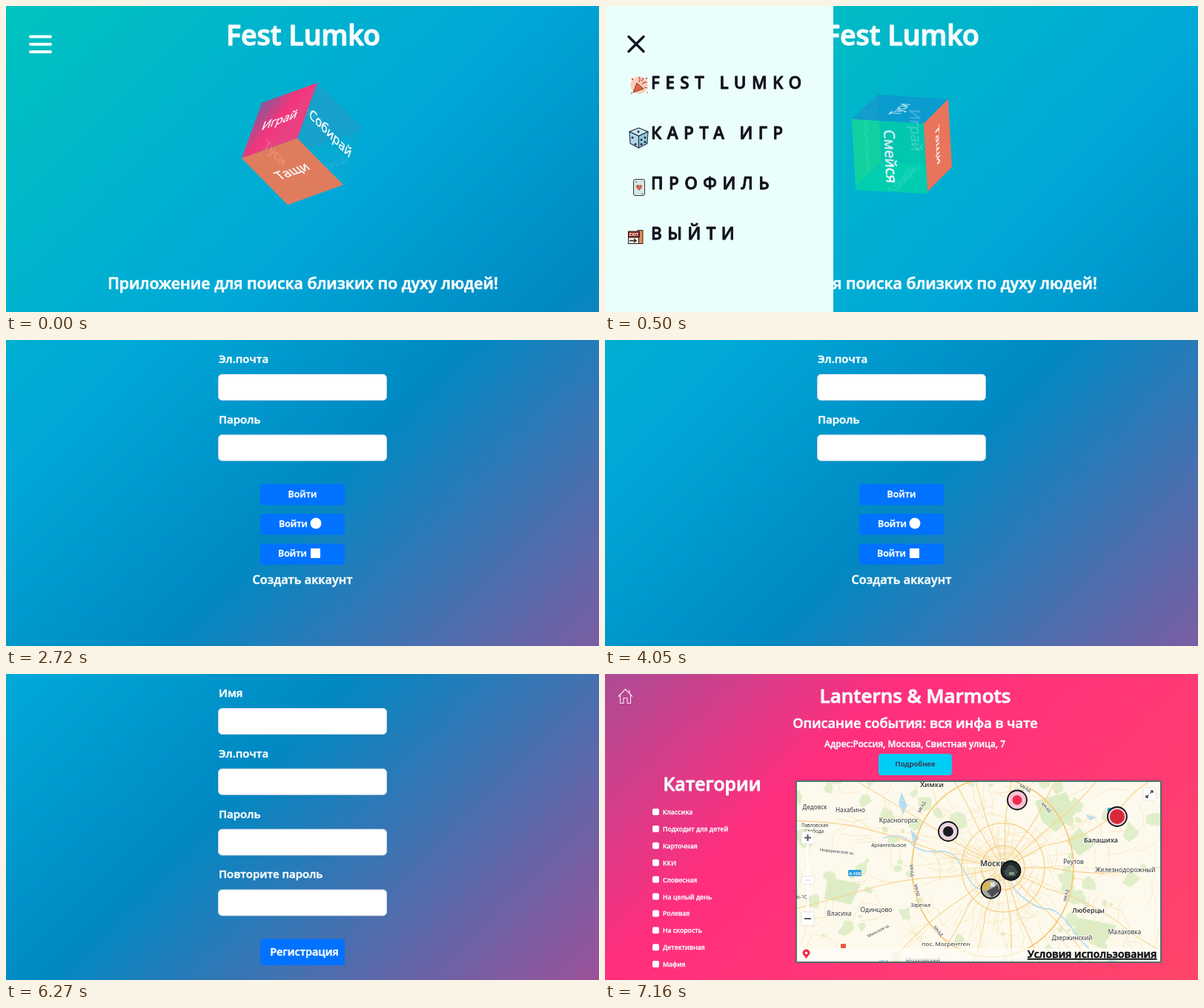
These frames come from a looping animation (800 by 414 pixels, 8000 ms). An HTML page:

```html
<!DOCTYPE html>
<html lang="ru">
<head>
<meta charset="utf-8">
<title>Fest Lumko</title>
<style>
html, body { margin: 0; width: 100%; height: 100%; overflow: hidden; background: #00a8d8; }
#reel { display: flex; width: 4000px; height: 414px; animation: reel 8s step-end infinite; }
#reel svg {
  flex: none; width: 800px; height: 414px; display: block; color: #f6fcfc;
  font-family: "Open Sans", "Noto Sans", sans-serif; font-weight: 600;
  background: linear-gradient(135deg,
    #00c3be calc(var(--d) - 813px), #00a8d8 calc(var(--d) - 311px), #0089c3 var(--d),
    #ff2e7e calc(var(--d) + 872px), #ff456a calc(var(--d) + 1445px));
}
text { fill: currentColor; stroke: currentColor; stroke-width: .035em; stroke-linejoin: round; }
.word { font-weight: 500; stroke-width: .03em; }
.place { color: #25262a; font-weight: 400; stroke: #fffdf5; stroke-width: 1.6px; paint-order: stroke; }
.town { font-weight: 600; }
@keyframes reel {
  0% { transform: translateX(0); }
  6.25% { transform: translateX(-800px); }
  34% { transform: translateX(-1600px); }
  61.75% { transform: translateX(-2400px); }
  89.5%, 100% { transform: translateX(-3200px); }
}
</style>
</head>
<body>
<div id="reel"></div>
<script>
const APP = 'Fest Lumko';
const text = (x, y, size, str, attrs = '') =>
  `<text x="${x}" y="${y}" font-size="${size}" ${attrs}>${str}</text>`;
const mid = (x, y, size, str, attrs = '') => text(x, y, size, str, 'text-anchor="middle" ' + attrs);
const rect = (x, y, w, h, fill, rx = 0, attrs = '') =>
  `<rect x="${x}" y="${y}" width="${w}" height="${h}" fill="${fill}" rx="${rx}" ${attrs}/>`;
const disc = (x, y, r, fill, attrs = '') => `<circle cx="${x}" cy="${y}" r="${r}" fill="${fill}" ${attrs}/>`;
const line = (d, stroke, w = 1, attrs = '') =>
  `<path d="${d}" fill="none" stroke="${stroke}" stroke-width="${w}" ${attrs}/>`;
const shape = (d, fill, attrs = '') => `<path d="${d}" fill="${fill}" ${attrs}/>`;
const scene = (d, body) => `<svg viewBox="0 0 800 414" style="--d:${d}px">${body}</svg>`;

// Cube side: corner o, edge u along the text, edge v down the text
function side([x, y], [a, b], [c, d], fill, alpha, word, ink = 1) {
  const m = [a / 80, b / 80, c / 80, d / 80, x, y].join();
  return `<g transform="matrix(${m})">${rect(0, 0, 80, 80, fill, 0, `opacity="${alpha}"`)}` +
    mid(40, 45, 16.8, word, `class="word" opacity="${ink}"`) + '</g>';
}

const heading = mid(401, 53, 37.5, APP) +
  mid(400.5, 382.5, 21.3, 'Приложение для поиска близких по духу людей!');

function home() {
  const u = [75, -27], v = [-27, 75], w = [62, 63];
  return `<linearGradient id="pink" x1="0" y1="0" x2=".8" y2=".5">
      <stop offset="0" stop-color="#8d5598"/><stop offset=".65" stop-color="#ff2e76"/>
      <stop offset="1" stop-color="#f8397c"/></linearGradient>` +
    heading +
    line('M33 41.5H60M33 51.7H60M33 62H60', '#f6fcfc', 4, 'stroke-linecap="round"') +
    side([381, 269], u, [28, -74], '#00b4cc', .2, 'Смейся', .14) +
    side([345, 131], w, u, '#3b8fb8', .4, 'Ищи', .14) +
    side([420, 104], w, v, '#14a4cc', .3, 'Собирай') +
    side([345, 131], u, v, 'url(#pink)', .94, 'Играй') +
    side([318, 206], u, w, '#ec7a58', .95, 'Тащи') +
    side([345, 131], w, v, 'none', 0, 'Туси', .16);
}

function popper() {
  return disc(46, 107, 11.5, '#fbcdb8') +
    shape('M38 117L43 104L52 112Z', '#e2633f', 'stroke="#5a2a2a" stroke-width=".8"') +
    line('M46 103Q48 99 46 96M50 106Q53 102 57 103M53 110L57 111M49 102L52 97', '#b8433a', 1.2) +
    disc(37, 99, 1.2, '#d9534a') + disc(56, 98, 1.2, '#d9534a') + disc(36, 118, 1, '#d9534a') + disc(57, 117, 1, '#e58b4a');
}
function dice() {
  const edge = 'stroke="#1d2c3c" stroke-width="1.1" stroke-linejoin="round"';
  const pips = [[45, 170], [37, 178], [41, 187], [49, 181], [54, 178], [49, 187], [54, 184]];
  return shape('M45.5 165L58 170L45.5 176L33 170Z', '#cbe6f2', edge) +
    shape('M33 170L45.5 176V192L34 186Z', '#aed6e8', edge) +
    shape('M58 170L45.5 176V192L57 186Z', '#98c6de', edge) +
    pips.map(([x, y]) => disc(x, y, 1.5, '#172434')).join('');
}
function card() {
  return rect(38.5, 234.5, 15, 22, '#d8e6e2', 2.5, 'stroke="#2f3a40"') +
    shape('M46 249C40 244 43 240.5 46 243.5C49 240.5 52 244 46 249Z', '#e8663c', 'stroke="#5a2a2a" stroke-width=".6"') +
    line('M41 238H43M49 254H51', '#444');
}
function exit() {
  return rect(44, 303.5, 7, 18, '#e08a55', 0, 'stroke="#3a2420"') +
    rect(31.5, 305, 15, 7.5, '#9c2b24', 0, 'stroke="#2a1a1a"') +
    mid(39, 311, 6, 'EXIT') + rect(31.5, 313, 14, 8.5, '#f4efe6', 0, 'stroke="#2a1a1a"') +
    line('M33 317.5H42M39 315L42 317.5L39 320', '#222', 1.3);
}

function menu() {
  const items = [[APP.toUpperCase(), 111.5], ['КАРТА ИГР', 180], ['ПРОФИЛЬ', 248], ['ВЫЙТИ', 316]];
  return heading +
    side([368, 119], [5, 91], [-35, 34], '#7cc06a', .4, 'Собирай', .3) +
    side([430, 158], [5, 96], [-97, -5], '#00de9e', .66, 'Смейся') +
    side([333, 153], [34, -33], [97, 6], '#0c98d4', .84, 'Туси') +
    side([463, 126], [5, 91], [-95, -7], '#0c98b4', .14, 'Играй', .22) +
    side([338, 249], [33, -35], [97, 5], 'none', 0, 'Собирай', .16) +
    side([463, 126], [5, 92], [-33, 33], '#f07458', .97, 'Тащи') +
    rect(0, 0, 308, 414, '#eafffb') +
    line('M32 41.5L52 61.5M52 41.5L32 61.5', '#14141f', 3.4, 'stroke-linecap="round"') +
    popper() + dice() + card() + exit() +
    items.map(([s, y]) => text(62, y, 22.5, s, 'color="#11111c" letter-spacing="7.4"')).join('');
}

const field = (name, i) => text(287, 31 + i * 81.8, 15, name) +
  rect(286.5, 46.5 + i * 81.8, 227, 35, '#fff', 5, 'stroke="#ced8e2"');
const button = (y, h, label, x = 400, size = 12.4) =>
  rect(343, y, 114, h, '#0072ff', 3.5) + mid(x, y + h / 2 + size * .3, size, label);

const login = () => ['Эл.почта', 'Пароль'].map(field).join('') +
  button(195, 28.5, 'Войти') + button(235, 28.5, 'Войти', 387.5) + button(275.5, 28.5, 'Войти', 386.5) +
  disc(418, 248, 7.5, '#fff') + rect(411, 282, 13, 13, '#fff') +
  mid(400, 330, 16.2, 'Создать аккаунт');

const signup = () => ['Имя', 'Эл.почта', 'Пароль', 'Повторите пароль'].map(field).join('') +
  button(358.5, 35.5, 'Регистрация', 402.5, 14.4);

let seed = 11;
const rnd = (lo = 0, hi = 1) => {
  seed = (seed * 16807) % 2147483647;
  return lo + (hi - lo) * seed / 2147483647;
};

function roads() {
  const cx = 537, cy = 262;
  const at = (t, r) => `${(cx + Math.cos(t) * r).toFixed(1)} ${(cy + Math.sin(t) * r).toFixed(1)}`;
  let woods = '', lanes = '', mains = '';
  for (let i = 0; i < 150; i++) {
    const t = rnd(0, 6.28), r = rnd(85, 320), n = rnd(3, 14), p = [];
    const x = cx + Math.cos(t) * r, y = cy + Math.sin(t) * r;
    for (let k = 0; k < 7; k++) {
      const q = rnd(.5, 1.2) * n;
      p.push(`${(x + Math.cos(k * .9) * q).toFixed(1)} ${(y + Math.sin(k * .9) * q).toFixed(1)}`);
    }
    woods += `M${p.join('L')}Z`;
  }
  for (let i = 0; i < 460; i++) {
    const t = rnd(0, 6.28), r = 10 + 290 * rnd() ** 1.3;
    lanes += rnd() < .5
      ? `M${at(t, r)}L${at(t + rnd(-.06, .06), r + 20)}L${at(t + rnd(-.1, .1), r + 40)}`
      : `M${at(t, r)}L${at(t + 14 / r, r + rnd(-5, 5))}L${at(t + 32 / r, r + rnd(-9, 9))}`;
  }
  for (let i = 0; i < 17; i++) {
    const t = i * .3696 + rnd(-.08, .08);
    mains += `M${at(t, 14)}L${at(t + rnd(-.1, .1), 65)}Q${at(t + rnd(-.12, .12), 130)} ${at(t + rnd(-.1, .1), 190)}T${at(t, 340)}`;
  }
  const ring = (x, y, rx, ry, w) =>
    `<ellipse cx="${x}" cy="${y}" rx="${rx}" ry="${ry}" fill="none" stroke="#f6c874" stroke-width="${w}"/>`;
  return shape(woods, '#e0efca') +
    shape('M580 172L622 160L634 190L608 214L590 200ZM300 275L345 284L332 312L296 304ZM640 330L690 340L670 372L630 350ZM640 208L662 230L640 246L622 226Z', '#dcedc5') +
    line('M375 222Q400 214 412 228T446 240T476 252T494 282T526 284T548 280T566 304T598 318T634 350T690 390', '#b4def4', 1.8) +
    shape('M400 160L408 178L402 190L396 174ZM412 210L424 222L416 230ZM648 190L664 194L654 198Z', '#b4def4') +
    line(lanes, '#f6e2b4', .7) + line(mains, '#f8d08a', 1.1) +
    ring(523, 262, 109, 121, 1.7) + ring(537, 262, 56, 60, 1.1) + ring(537, 262, 29, 30, 1.2) + ring(536, 262, 12, 12, .8);
}

function pin(x, y, fill, inner = '') {
  return disc(x, y, 13, fill) + inner + disc(x, y, 13, 'none', 'stroke="#10131a" stroke-width="1.8"');
}

function map() {
  const places = [
    [441, 153, 9.5, 'Химки', 1], [283, 183, 8.3, 'Дедовск'], [331, 187, 8.3, 'Нахабино'],
    [396, 201, 8.6, 'Красногорск'], [283, 207, 6.3, 'Павловская'], [282, 214.5, 6.3, 'Слобода'],
    [383, 234, 6.6, 'Архангельское'], [669, 228, 9, 'Балашиха', 1], [632, 257, 8.4, 'Реутов'],
    [702, 268, 8.6, 'Железнодорожный'], [366, 322, 8.6, 'Одинцово'], [426, 315, 6.6, 'Заречье'],
    [316, 327, 8.3, 'Власиха'], [652, 323, 9, 'Люберцы', 1], [630, 360, 8.3, 'Дзержинский'],
    [701, 352, 8.3, 'Малаховка'], [460, 368, 8, 'пос. Мосрентген'], [429, 389, 8, 'Московский'],
    [526, 260, 10.5, 'Москва', 1], [265, 304, 7, 'ю-10']
  ];
  const signs = [[566, 156, 30, 'МКАД'], [429, 181, -62, 'МКАД'], [594, 182, 45, 'МКАД'], [412, 266, 85, 'МКАД'],
    [419, 293, 75, 'МКАД'], [624, 300, -78, 'МКАД'], [448, 349, 50, 'МКАД'], [313, 242, 6, 'Новорижское ш.'], [370, 349, -28, 'Минское ш.']];
  const box = (x, y, w, h) => rect(x, y, w, h, '#fff', 2, 'stroke="#d8d8d2" stroke-width=".6"');
  return '<clipPath id="frame"><rect x="258" y="145" width="492" height="245"/></clipPath>' +
    '<g clip-path="url(#frame)">' + rect(257, 144, 494, 247, '#fdf9ec') + roads() +
    places.map(([x, y, s, name, big]) => mid(x, y, s, name, `class="place${big ? ' town' : ''}"`)).join('') +
    signs.map(([x, y, a, name]) => mid(x, y, 5.8, name, `class="place" transform="rotate(${a} ${x} ${y})"`)).join('') +
    rect(328, 265, 18, 8.5, '#2b9be0', 1.5) + mid(337, 271.6, 6, 'А-106') +
    rect(678, 181, 12, 7, '#2b9be0', 1.5) + rect(318, 365, 7, 6, '#ea5a3c', 1) +
    mid(376, 391, 6, 'УКД', 'color="#69a5e2"') +
    rect(261, 371, 489, 16, '#fffef8', 2, 'opacity=".72"') + '</g>' +
    rect(258, 145, 492, 245, 'none', 0, 'stroke="#55706e" stroke-width="2"') +
    line('M273.5 230V322', '#fff', 3) +
    box(265, 213, 17, 17) + box(265, 322, 17, 18) + box(265, 274, 17, 10) + box(726, 154, 17, 17) +
    line('M269 221.5H278M273.5 217V226M269 331H278', '#5a5a5a', 2) +
    line('M270 279H277', '#aaa', 1, 'stroke-dasharray="1.5 1.5"') +
    line('M735.5 161.5L739 158M736 158H739V161M733.5 163.5L730 167M730 164V167H733', '#444', 1.3) +
    shape('M271.5 385C268 380 266.5 379 266.5 377.5A5 5 0 0 1 276.5 377.5C276.5 379 275 380 271.5 385Z', '#ef2f45') +
    disc(271.5, 377.5, 1.8, '#fff') +
    pin(463, 213, '#ecd6df', disc(463, 213, 7, '#1c1c20')) +
    pin(556, 170.5, '#f7c4d4', disc(556, 170.5, 6.5, '#ec2d50')) +
    pin(691, 193, '#f0ccd0', disc(691, 193, 10, '#d8293c')) +
    pin(547.5, 266, '#20282a', shape('M538 268L545 258L552 260L557 268L553 274H542Z', '#3f4e49') + rect(545, 268, 7, 4, '#8a9186')) +
    pin(520.5, 290.5, '#a9aaa2', shape('M510 283L521 280L518 291L508 293Z', '#d8b65a') +
      shape('M515 294L530 285L532 294L522 302Z', '#4b4e52') + rect(520, 282, 6, 6, '#e0e0da')) +
    text(570, 384, 14.2, 'Условия использования', 'color="#0c0c10" text-decoration="underline"');
}

function events() {
  const kinds = ['Классика', 'Подходит для детей', 'Карточная', 'ККИ', 'Словесная',
    'На целый день', 'Ролевая', 'На скорость', 'Детективная', 'Мафия'];
  return line('M18 30.5L27.5 20.5L37 30.5M20.5 28V39.5H25V32.5H30V39.5H34.5V28M33 26V21.5', '#f6e8f4', 1.1, 'stroke-linejoin="round"') +
    mid(418.5, 39, 26, 'Lanterns &amp; Marmots') +
    mid(418.5, 73, 18.2, 'Описание события: вся инфа в чате') +
    mid(418, 99, 11.8, 'Адрес:Россия, Москва, Свистная улица, 7') +
    rect(369, 108, 99, 29, '#00cdf5', 4) + mid(418.5, 125, 9.6, 'Подробнее', 'color="#38405a"') +
    mid(144.5, 157.5, 24.8, 'Категории') +
    kinds.map((name, i) => rect(64, 182 + i * 22.9, 9, 9, '#fff', 2) + text(78, 190 + i * 22.9, 8.7, name)).join('') +
    map();
}

document.getElementById('reel').innerHTML =
  scene(806, home()) + scene(905, menu()) + scene(438, login()) + scene(325, signup()) + scene(-587, events());
</script>
</body>
</html>
```
